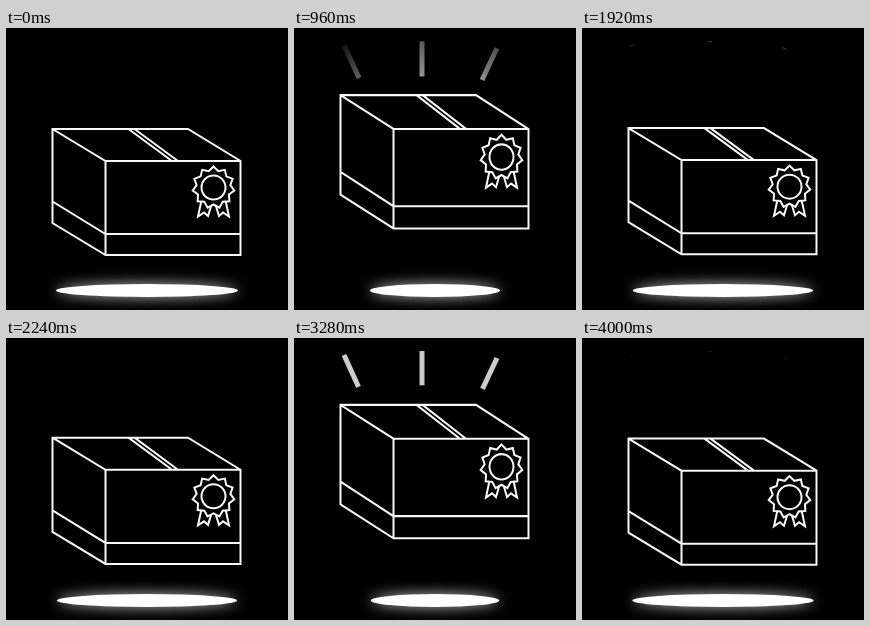
An HTML page with a canvas that plays this animation: 282x282 px, repeating every 4.08 s.

```html
<!DOCTYPE html>
<html lang="en">
<head>
<meta charset="utf-8">
<title>Floating box</title>
<style>
  html, body { margin: 0; height: 100%; overflow: hidden; background: #000; }
  canvas { display: block; width: 100vw; height: 100vh; }
</style>
</head>
<body>
<canvas id="stage" width="282" height="282"></canvas>
<script>
const ctx = document.getElementById('stage').getContext('2d');
const PERIOD = 2040, PEAK = 1120;
const LINE = '#f8f8f8';

const clamp = v => Math.min(1, Math.max(0, v));
const mix = (a, b, k) => a + (b - a) * k;

// Cubic easing with flat ends: control points (a, 0) and (b, 1).
function ease(p, a, b) {
  p = clamp(p);
  let low = 0, high = 1;
  for (let i = 0; i < 24; i++) {
    const s = (low + high) / 2, r = 1 - s;
    const x = 3 * r * r * s * a + 3 * r * s * s * b + s * s * s;
    if (x < p) low = s; else high = s;
  }
  return low * low * (3 - 2 * low);
}

function riseAndFall(t, up, down) {
  return t < PEAK
    ? ease(t / PEAK, ...up)
    : 1 - ease((t - PEAK) / (PERIOD - PEAK), ...down);
}

function piecewise(t, stops) {
  for (let i = 1; i < stops.length; i++) {
    const [t0, v0] = stops[i - 1], [t1, v1] = stops[i];
    if (t <= t1) return mix(v0, v1, clamp((t - t0) / (t1 - t0)));
  }
  return stops[stops.length - 1][1];
}

function makeRosette() {
  const points = [];
  for (let i = 0; i < 22; i++) {
    const angle = i * Math.PI / 11, radius = i % 2 ? 17 : 21;
    points.push([207.5 + radius * Math.sin(angle), 159.5 - radius * Math.cos(angle)]);
  }
  return new Path2D('M' + points.map(p => p.join()).join('L') + 'Z');
}

const box = new Path2D(
  'M46.5 101H182L234.5 133V227H99.5L46.5 195Z' +
  'M46.5 101L99.5 133H234.5M99.5 133V227' +
  'M46.5 173.5L99.5 206H234.5' +
  'M122.5 101L166 133M128.5 101L172 133');
const ribbons = new Path2D(
  'M196 170L192 188.5L198 184.5L202 188L206 175' +
  'M219 170L223 188.5L217 184.5L213 188L209 175');
const rosette = makeRosette();
const seal = new Path2D();
seal.arc(207.5, 159.5, 12, 0, Math.PI * 2);

// Base point, tip point, and how strongly the ray is dimmed while it fades.
const rays = [
  { base: [65, 50], tip: [50, 17], dim: 0.5 },
  { base: [128, 48.5], tip: [128, 13], dim: 0 },
  { base: [188, 52], tip: [203, 20], dim: 0.06 }
];

function drawShadow(t) {
  const shrink = riseAndFall(t, [0.58, 0.55], [0.9, 0.5]);
  ctx.save();
  ctx.fillStyle = '#fff';
  ctx.shadowColor = 'rgba(255,255,255,.75)';
  ctx.shadowBlur = 14;
  ctx.beginPath();
  ctx.ellipse(141, 262.5, mix(91, 64, shrink), 6.5, 0, 0, Math.PI * 2);
  ctx.fill();
  ctx.restore();
}

function drawBox(t) {
  const lift = riseAndFall(t, [0.6, 0.35], [0.75, 0.49]);
  ctx.save();
  ctx.translate(0, 227 - 27 * lift);
  ctx.scale(1, 1 + 0.06 * lift);
  ctx.translate(0, -227);
  ctx.strokeStyle = LINE;
  ctx.fillStyle = '#000';
  ctx.lineWidth = 2;
  ctx.lineJoin = 'miter';
  ctx.stroke(box);
  ctx.stroke(ribbons);
  ctx.fill(rosette);
  ctx.stroke(rosette);
  ctx.stroke(seal);
  ctx.restore();
}

function drawRays(t) {
  const head = 1 - (1 - clamp((t - 580) / 540)) ** 4;
  const tail = ease((t - 1020) / 1020, 0.75, 0.6);
  if (head <= tail) return;
  const glow = piecewise(t, [[570, 0.4], [600, 0.48], [960, 0.58], [1240, 0.8],
    [1600, 0.54], [1960, 0.15], [PERIOD, 0]]);
  const tipFade = piecewise(t, [[600, 0], [960, 0.4], [1240, 0]]);
  ctx.lineWidth = 5;
  for (const { base, tip, dim } of rays) {
    const at = k => [mix(base[0], tip[0], k), mix(base[1], tip[1], k)];
    const start = at(tail), end = at(head);
    const alpha = glow * (1 - dim * clamp((0.8 - glow) / 0.32));
    const gradient = ctx.createLinearGradient(...start, ...end);
    gradient.addColorStop(0, `rgba(255,255,255,${alpha})`);
    gradient.addColorStop(1, `rgba(255,255,255,${alpha * (1 - tipFade * (1 + dim * 2))})`);
    ctx.strokeStyle = gradient;
    ctx.beginPath();
    ctx.moveTo(...start);
    ctx.lineTo(...end);
    ctx.stroke();
  }
}

const started = performance.now();
function frame() {
  const t = (performance.now() - started) % PERIOD;
  ctx.fillStyle = '#000';
  ctx.fillRect(0, 0, 282, 282);
  drawShadow(t);
  drawRays(t);
  drawBox(t);
  requestAnimationFrame(frame);
}
frame();
</script>
</body>
</html>
```
